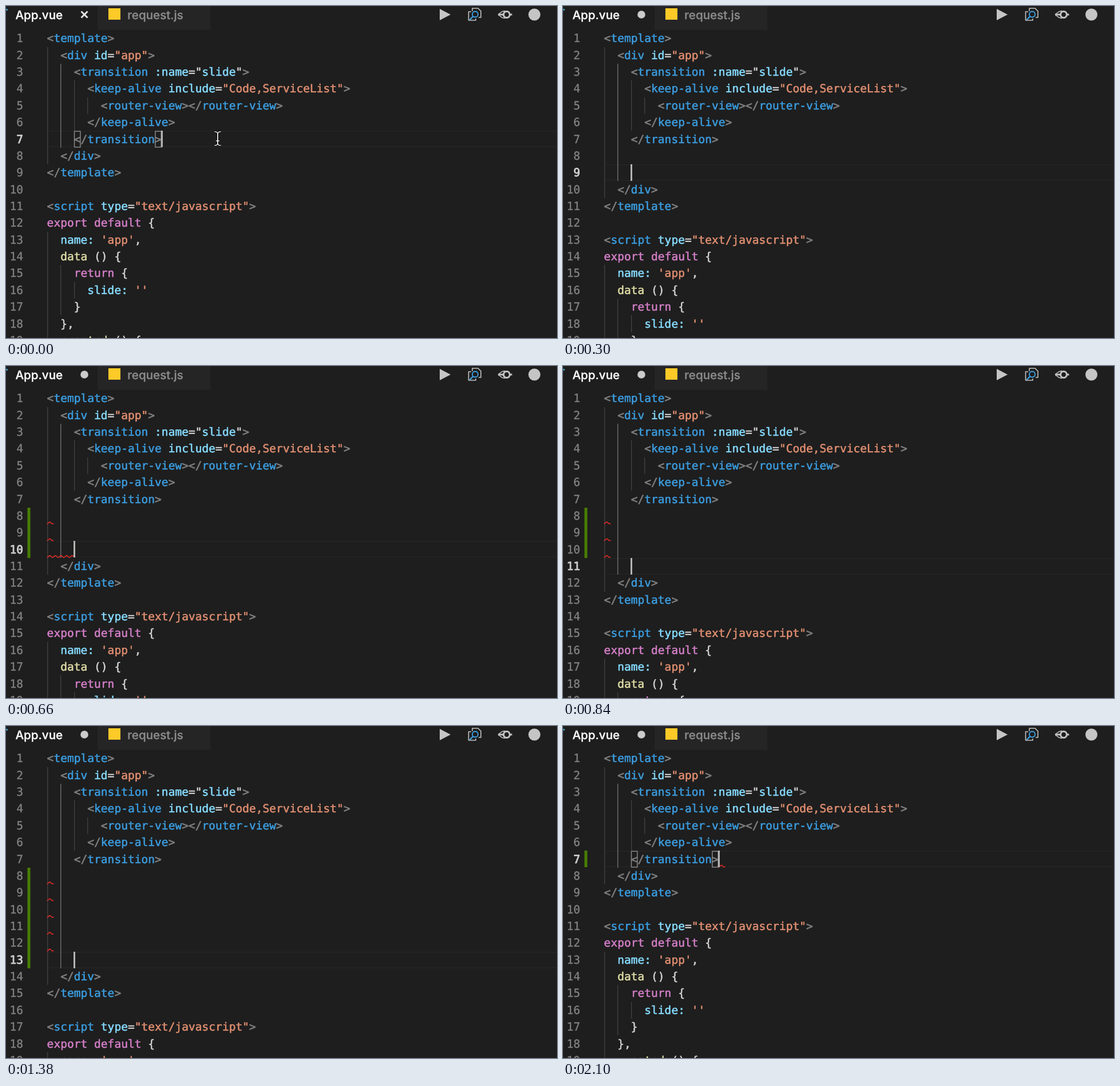
An HTML page with a canvas that plays this animation: 963x581 px, repeating every 2160 ms.

```html
<!DOCTYPE html>
<html lang="en">
<head>
<meta charset="utf-8">
<title>Code editor</title>
<style>
  html, body { margin: 0; width: 100%; height: 100%; overflow: hidden; background: #1e1e1e; }
  canvas { display: block; }
</style>
</head>
<body>
<canvas id="stage" width="963" height="581"></canvas>
<script>
const ctx = document.getElementById('stage').getContext('2d');
const WIDTH = 963, HEIGHT = 581, LOOP = 2160;
const X0 = 71.6, Y0 = 42.2, CW = 11.78, LH = 29.36;
const CODE_FONT = '19.57px "DejaVu Sans Mono", Menlo, monospace';
const UI_FONT = '500 20.6px Inter, Roboto, sans-serif';
const BG = '#1e1e1e', ICON = '#c5c5c5';

// Each token is "~", a colour key and its text.
const COLORS = {
  g: '#808080', t: '#3b9de0', a: '#86dcff', s: '#e08e70',
  k: '#d47fc8', f: '#dfdca6', w: '#d4d4d4'
};
const HEAD = [
  '~g<~ttemplate~g>',
  '  ~g<~tdiv~a id~w=~s"app"~g>',
  '    ~g<~ttransition~a :name~w="~aslide~w"~g>',
  '      ~g<~tkeep-alive~a include~w=~s"Code,ServiceList"~g>',
  '        ~g<~trouter-view~g></~trouter-view~g>',
  '      ~g</~tkeep-alive~g>',
  '    ~g</~ttransition~g>'
];
const TAIL = [
  '  ~g</~tdiv~g>',
  '~g</~ttemplate~g>',
  '',
  '~g<~tscript~a type~w=~s"text/javascript"~g>',
  '~kexport default~w {',
  '  ~aname:~s \'app\'~w,',
  '  ~fdata~w () {',
  '    ~kreturn~w {',
  '      ~aslide:~s \'\'',
  '    ~w}',
  '  ~w},',
  '  ~fcreated~w () {'
];

// time, blank lines added, lines with lint marks, lines with change bars
const STEPS = [
  [0, 0, 0, 0], [60, 1, 0, 0], [240, 2, 0, 0], [480, 3, 0, 0],
  [600, 3, 3, 3], [720, 4, 3, 3], [900, 5, 3, 3], [960, 5, 5, 3],
  [1200, 6, 5, 3], [1320, 6, 5, 6], [1440, 6, 6, 6]
];
const UNDO_AT = 1800, UNDO_STEP = 60;

const colX = col => X0 + col * CW;
const rowY = row => Y0 + (row - 1) * LH;

function stateAt(t) {
  if (t >= UNDO_AT) {
    const n = Math.max(0, 5 - Math.floor((t - UNDO_AT) / UNDO_STEP));
    return { n, lint: n, bars: n, undo: true };
  }
  const [, n, lint, bars] = STEPS.filter(s => s[0] <= t).pop();
  return { n, lint, bars, undo: false };
}

function rect(x, y, w, h, color) {
  ctx.fillStyle = color;
  ctx.fillRect(x, y, w, h);
}

function disc(x, y, r, color) {
  ctx.fillStyle = color;
  ctx.beginPath();
  ctx.arc(x, y, r, 0, Math.PI * 2);
  ctx.fill();
}

function line(points, color, width) {
  ctx.strokeStyle = color;
  ctx.lineWidth = width;
  ctx.beginPath();
  points.forEach(([x, y], i) => i ? ctx.lineTo(x, y) : ctx.moveTo(x, y));
  ctx.stroke();
}

function ring(x, y, r, color, width) {
  ctx.strokeStyle = color;
  ctx.lineWidth = width;
  ctx.beginPath();
  ctx.arc(x, y, r, 0, Math.PI * 2);
  ctx.stroke();
}

// A hairline outline gives the heavier smoothed strokes.
function glyphs(str, x, y, color, weight) {
  ctx.fillStyle = ctx.strokeStyle = color;
  ctx.lineWidth = weight;
  ctx.fillText(str, x, y);
  ctx.strokeText(str, x, y);
}

// Characters sit on a fixed grid.
function mono(str, x, row, color, weight = 0.55) {
  ctx.font = CODE_FONT;
  [...str].forEach((ch, i) => {
    if (ch !== ' ') glyphs(ch, x + i * CW, rowY(row) + 21.2, color, weight);
  });
}

function codeLine(src, row) {
  const [indent, ...tokens] = src.split('~');
  let col = indent.length;
  for (const token of tokens) {
    const str = token.slice(1);
    mono(str, colX(col), row, COLORS[token[0]]);
    col += str.length;
  }
}

function guide(col, from, to, color = '#404040') {
  const top = Math.round(rowY(from));
  rect(Math.round(colX(col)), top, 1.4, Math.round(rowY(to + 1)) - top, color);
}

function squiggle(col, row, chars) {
  const x = colX(col), y = rowY(row + 1) - 2.4, wave = [];
  for (let dx = 0; dx <= chars * CW; dx += 0.5) {
    wave.push([x + dx, y + 1.6 * Math.cos(dx / 9.8 * Math.PI * 2)]);
  }
  line(wave, '#e62c26', 1.6);
}

function bracketBox(col, row) {
  ctx.strokeStyle = '#888';
  ctx.lineWidth = 1.5;
  ctx.strokeRect(colX(col) + 0.8, rowY(row) + 1, CW - 1.4, LH - 1.8);
}

function drawIcons() {
  ctx.fillStyle = ICON;
  ctx.beginPath();
  ctx.moveTo(758, 5);
  ctx.lineTo(777, 15);
  ctx.lineTo(758, 25);
  ctx.fill();

  // Page with magnifier
  line([[815, 9], [815, 4], [825, 4], [830, 9], [830, 20], [826, 20]], ICON, 1.6);
  line([[813, 10], [808.5, 10], [808.5, 25], [821, 25], [821, 22]], ICON, 1.6);
  ring(820, 14.5, 5, '#3ea6ee', 1.8);
  line([[816, 18.5], [810.5, 24]], '#3ea6ee', 2.3);

  // Eye
  ring(875, 15, 5.4, ICON, 3);
  line([[860, 15], [870, 15]], ICON, 3);
  line([[880, 15], [884.5, 15]], ICON, 3);
  line([[861, 14], [867, 9.8], [872, 8.5]], ICON, 1.5);
  line([[861, 16], [867, 20.2], [872, 21.5]], ICON, 1.5);

  disc(923.5, 15, 10.5, ICON);
}

function drawTabs(dirty) {
  rect(160, 0, 197, 42, '#252526');
  rect(0, 5, 3, 3, '#428fb5');
  rect(179, 4, 21, 20, '#ffca28');
  ctx.font = UI_FONT;
  glyphs('App.vue', 16.5, 22.7, '#fff', 0.35);
  glyphs('request.js', 212.3, 22.7, '#8b8b8b', 0.35);
  if (dirty) {
    disc(137, 15, 6.8, '#cbcbcb');
  } else {
    line([[131.5, 9.5], [142.5, 20.5]], '#e6e6e6', 2.8);
    line([[142.5, 9.5], [131.5, 20.5]], '#e6e6e6', 2.8);
  }
  drawIcons();
}

function drawPointer(x, y) {
  const beam = [
    [[x - 5.5, y - 12], [x - 2, y - 11.5], [x, y - 9.5], [x, y + 9.5], [x - 2, y + 11.5], [x - 5.5, y + 12]],
    [[x + 5.5, y - 12], [x + 2, y - 11.5], [x, y - 9.5], [x, y + 9.5], [x + 2, y + 11.5], [x + 5.5, y + 12]],
    [[x - 3, y + 4], [x + 3, y + 4]]
  ];
  beam.forEach(part => line(part, '#000', 3.4));
  beam.forEach(part => line(part, '#ececec', 1.5));
}

function draw(t) {
  const { n, lint, bars, undo } = stateAt(t);
  const active = 7 + n;
  const top = Math.round(rowY(active));

  rect(0, 0, WIDTH, HEIGHT, BG);
  rect(72, top, WIDTH - 72, 2, '#232323');
  rect(72, top + 27, WIDTH - 72, 2, '#232323');

  guide(0, 2, 8 + n);
  guide(2, 3, active, '#707070');
  guide(4, 4, 6);
  guide(6, 5, 5);
  guide(0, 13 + n, 30);
  guide(2, 15 + n, 17 + n);
  guide(4, 16 + n, 16 + n);

  HEAD.forEach((src, i) => codeLine(src, i + 1));
  TAIL.forEach((src, i) => codeLine(src, i + 8 + n));
  for (let row = 1; row <= 19; row++) {
    const label = String(row), x = 30 - label.length * CW;
    if (row === active) mono(label, x, row, '#cecece', 0.9);
    else mono(label, x, row, '#828282', 0.35);
  }

  const emptied = undo && n === 0;
  const barTop = Math.round(rowY(emptied ? 7 : 8));
  const barRows = emptied ? 1 : bars;
  if (barRows) rect(37.5, barTop, 5, Math.round(barRows * LH), '#487e02');

  for (let i = 1; i <= lint; i++) squiggle(0, 7 + i, i === n && !undo ? 4 : 1);
  if (emptied) squiggle(17, 7, 1);

  if (n === 0) {
    bracketBox(4, 7);
    bracketBox(16, 7);
  }
  const blink = t >= 1680 && t < UNDO_AT;
  if (!blink) rect(Math.round(colX(n ? 4 : 17)) - 1, top, 3, 29, '#b4b5b3');

  drawTabs(t >= 60);
  if (t < 60) drawPointer(370, 232);
}

ctx.textRendering = 'geometricPrecision';
ctx.lineJoin = 'round';
const start = performance.now();
function tick() {
  draw((performance.now() - start) % LOOP);
  requestAnimationFrame(tick);
}
draw(0);
requestAnimationFrame(tick);
</script>
</body>
</html>
```
